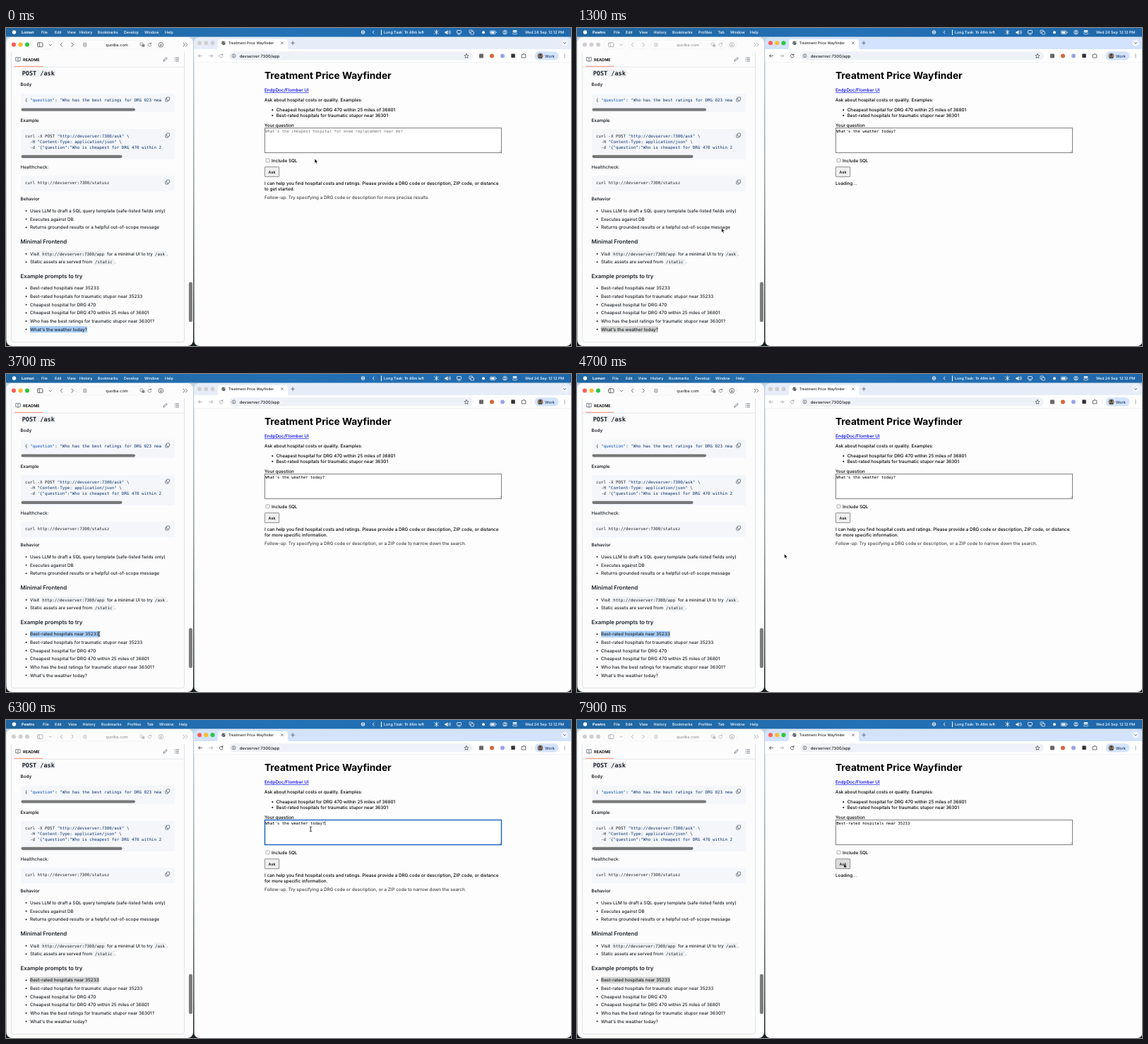
Recreate the animation shown at these times as an HTML page. Size 800x450 px, loop 8 s.

```html
<!DOCTYPE html>
<html lang="en">
<head>
<meta charset="utf-8">
<title>Screen demo</title>
<style>
html, body { margin: 0; width: 100%; height: 100%; overflow: hidden; background: #14508c; }
svg { display: block; width: 800px; height: 450px; font-weight: 450; }
text { font-family: Inter, "Open Sans", sans-serif; white-space: pre; text-rendering: geometricPrecision; }
.mono, .mono text { font-family: "DejaVu Sans Mono", "Liberation Mono", monospace; }
.line { fill: none; stroke-linecap: round; stroke-linejoin: round; }
</style>
</head>
<body>
<svg id="stage" viewBox="0 0 800 450"></svg>
<script>
const stage = document.getElementById('stage');
const $ = id => document.getElementById(id);

const text = (x, y, s, size = 6.34, more = '') =>
  `<text x="${x}" y="${y}" font-size="${size}" ${more}>${s}</text>`;
const mono = (x, y, s, size = 5.83, more = '') => text(x, y, s, size, 'class="mono" ' + more);
const bold = (x, y, s, size = 6.34, more = '') => text(x, y, s, size, 'font-weight="600" ' + more);
const pick = (x, y, s, size = 6.34, more = '') => text(x, y, s, size, 'data-pick="1" ' + more);
const rect = (x, y, w, h, fill, r = 0, more = '') =>
  `<rect x="${x}" y="${y}" width="${w}" height="${h}" fill="${fill}" rx="${r}" ${more}/>`;
const dot = (x, y, r, fill, more = '') => `<circle cx="${x}" cy="${y}" r="${r}" fill="${fill}" ${more}/>`;
const line = (d, color = '#444', w = .8, more = '') =>
  `<path class="line" d="${d}" stroke="${color}" stroke-width="${w}" ${more}/>`;
const group = (id, s, more = '') => `<g id="${id}" ${more}>${s}</g>`;
const span = (s, color) => `<tspan fill="${color}">${s}</tspan>`;
const lights = (id, xs, y) =>
  xs.map(x => dot(x, y, 3, '#cfcfd1')).join('') +
  group(id, xs.map((x, i) => dot(x, y, 3, ['#ff5f57', '#febc2e', '#28c840'][i])).join(''));

// ---- menu bar ----
const menu = (id, names, xs) => group(id, names.map((n, i) =>
  text(xs[i], 8.2, n, 5.3, i ? '' : 'font-weight="700"')).join(''), 'fill="#fff"');

function menuBar() {
  const w = '#fff';
  return rect(0, 0, 800, 12.4, 'url(#bar)') + dot(11.5, 6, 2.7, w) +
    rect(65, .8, 18, 10.4, '#fff', 2.5, 'id="editFlash" fill-opacity=".28"') +
    menu('menuA', ['Lomari', 'File', 'Edit', 'View', 'History', 'Bookmarks', 'Develop', 'Window', 'Help'],
      [22, 50, 69, 86.5, 104, 130, 167, 196, 225]) +
    menu('menuB', ['Pewtro', 'File', 'Edit', 'View', 'History', 'Bookmarks', 'Profiles', 'Tab', 'Window', 'Help'],
      [22, 52, 69, 88, 108.5, 135, 172, 199.5, 217, 245]) +
    dot(505.5, 6, 2.3, 'none', 'stroke="#fff"') + dot(505.5, 6, 1, w) +
    line('M521 4l-1.8 2 1.8 2', w) + rect(531, 2.5, 1, 7.5, w) +
    text(535, 8.2, 'Long Task: 1h 48m left', 5.3, 'fill="#fff"') +
    line('M607 4l5 4M607 8l5-4M609.5 3v6', w) +
    `<path d="M621.5 5h1.7l2.2-1.8v6l-2.2-1.8h-1.7z" fill="#fff"/>` + line('M627 4.5q1.3 1.6 0 3.2M628.6 3.5q2 2.6 0 5', w, .7) +
    rect(638.5, 3.5, 6, 4, 'none', .7, 'stroke="#fff" stroke-width=".8"') + line('M640 9.2h3', w) +
    rect(656, 3, 4.5, 4, 'none', .7, 'stroke="#fff" stroke-width=".7"') +
    rect(658, 5, 4.5, 4, '#2a6db0', .7, 'stroke="#fff" stroke-width=".7"') +
    dot(676, 6.2, 2, w) +
    rect(685.5, 4, 7.5, 4.5, 'none', 1.2, 'stroke="#fff" stroke-width=".7"') + rect(686.5, 5, 5, 2.5, w, .5) + rect(693.7, 5.4, .8, 1.7, w) +
    dot(706.5, 6, 2.8, 'none', 'stroke="#fff" stroke-width=".7"') + dot(706.5, 5.2, 1, w) + line('M705 7.7q1.5-1.3 3 0', w) +
    rect(717.5, 3.2, 6, 2.3, w, 1.1) + rect(717.5, 6.5, 6, 2.3, 'none', 1.1, 'stroke="#fff" stroke-width=".6"') +
    text(735, 8.2, 'Wed 24 Sep', 5.3, 'fill="#fff"') + text(768, 8.2, '12:12 PM', 5.3, 'fill="#fff"');
}

// ---- left window: project notes ----
const copyIcon = y => rect(225.7, y - 1.2, 4.2, 4.2, 'none', .7, 'stroke="#59636e" stroke-width=".8"') +
  rect(227.4, y - 3, 4.2, 4.2, '#f4f6fa', .7, 'stroke="#59636e" stroke-width=".8"');
const chip = (x, y, w) => rect(x, y - 6.8, w, 9, '#eff1f3', 2);
const bullet = (y, s) => dot(28.6, y - 2.2, 1.05, '#1f2328') + text(34, y, s);
const promptY = i => 370.4 + i * 11.66;

function leftWindow() {
  const key = '#0550ae', str = '#0a3069', ink = '#1f2328';
  const tools = line('M61 23l1.8 1.8 1.8-1.8M79.6 21l-2.4 2.6 2.4 2.6M93 21l2.4 2.6-2.4 2.6') +
    rect(44.5, 20.8, 7.5, 5.8, 'none', 1.2, 'stroke="#444" stroke-width=".8"') + line('M47 21v5.4') +
    rect(109.8, 21.2, 4, 5, 'none', .6, 'stroke="#777" stroke-width=".7"') + line('M110.8 23h2M110.8 24.5h2', '#777', .6) +
    text(157, 25.8, 'quolba.com', 5.6, 'text-anchor="middle" fill="#333"') +
    rect(190, 21, 4, 3.8, 'none', .7, 'stroke="#777" stroke-width=".7"') + rect(192.3, 23, 4, 3.8, '#888', .7) +
    line('M205.3 22.2a2.4 2.4 0 1 0 .5 2M205.5 20.8v1.7h-1.7', '#666', .7) +
    dot(219.3, 23.7, 3.3, 'none', 'stroke="#444" stroke-width=".7"') + line('M219.3 22v3M218 24l1.3 1.3 1.3-1.3', '#444', .7) +
    line('M251 21.2l2.3 2.4-2.3 2.4M254.5 21.2l2.3 2.4-2.3 2.4');
  const pills = [[38, 30], [73, 28], [104, 107], [213, 13]]
    .map(([x, w]) => rect(x, 17.5, w, 12.4, '#fcfcfc', 6, 'stroke="#ededed" stroke-width=".5"')).join('');
  const prompts = ['Best-rated hospitals near 35233', 'Best-rated hospitals for traumatic stupor near 35233',
    'Cheapest hospital for DRG 470', 'Cheapest hospital for DRG 470 within 25 miles of 36801',
    'Who has the best ratings for traumatic stupor near 36301?', "What's the weather today?"];
  return rect(.4, 13, 264.6, 437, '#fcfcfc', 8) + pills + lights('lightsA', [11, 20.5, 30], 23.6) + group('toolsA', tools) +
    line('M7.5 35V441q0 3.5 3.5 3.5H249q3.5 0 3.5-3.5V35M7.5 55.2H252.5', '#d5dae0', .7) +
    line('M17 42.2q-1.4-1-3.2-.6v5q1.8-.3 3.2.6q1.4-.9 3.2-.6v-5q-1.8-.4-3.2.6v5', '#59636e', .8) +
    bold(24, 46.7, 'README', 5.6) + rect(12, 53.8, 40, 1, '#fd8c73') +
    line('M223 46.8l.5-1.8 3.4-3.4 1.3 1.3-3.4 3.4z', '#59636e') +
    line('M240.5 42h4M240.5 44.4h4M240.5 46.8h4M238.8 42h.1M238.8 44.4h.1M238.8 46.8h.1', '#59636e') +
    rect(258.9, 359.5, 5, 56.5, '#7b7b7b', 2.5) +
    `<g fill="${ink}">` +
    rect(21, 58.7, 49, 10.4, '#eff1f3', 2) + mono(22.7, 66.6, 'POST /ask', 8.5, 'font-weight="700"') +
    bold(20.5, 82.4, 'Body') + bold(20.5, 133.2, 'Example') +
    rect(21, 93, 218, 26, '#f4f6fa', 2) + rect(21, 143, 218, 43, '#f4f6fa', 2) + rect(21, 209, 218, 22, '#f4f6fa', 2) +
    '<g clip-path="url(#codeClip)">' +
    mono(27, 104.4, '{ ' + span('"question"', key) + ': ' + span('"Who has the best ratings for DRG 023 near"', str)) +
    mono(27, 155, 'curl -X POST ' + span('"http://devserver:7300/ask"', str) + ' \\') +
    mono(27, 163, '  -H ' + span('"Content-Type: application/json"', str) + ' \\') +
    mono(27, 171, '  -d ' + span('\'{"question":"Who is cheapest for DRG 470 within 25 miles', str)) + '</g>' +
    rect(21.5, 113.4, 161.5, 4.2, '#777', 2.1) + rect(21.5, 179.7, 143, 4.2, '#777', 2.1) +
    [101, 152, 218].map(copyIcon).join('') +
    text(20.5, 199.3, 'Healthcheck:') + mono(27, 221.2, 'curl http://devserver:7300/statusz') +
    bold(20.5, 244.3, 'Behavior') +
    bullet(261, 'Uses LLM to draft a SQL query template (safe-listed fields only)') +
    bullet(272.7, 'Executes against DB') +
    bullet(284.4, 'Returns grounded results or a helpful out-of-scope message') +
    bold(20.5, 305.2, 'Minimal Frontend', 7.85) +
    chip(49, 321.8, 92.5) + chip(208.7, 321.8, 19) + chip(123.5, 333.4, 30.5) +
    bullet(321.8, 'Visit') + mono(51.3, 321.6, 'http://devserver:7300/app') +
    text(143, 321.8, 'for a minimal UI to try') + mono(211, 321.6, '/ask') + text(227.8, 321.8, '.') +
    bullet(333.4, 'Static assets are served from') + mono(126, 333.2, '/static') + text(153.6, 333.4, '.') +
    bold(20.5, 354, 'Example prompts to try', 7.85) +
    rect(34, 0, 0, 9, '#a5cdf8', 0, 'id="noteSel"') +
    prompts.map((p, i) => bullet(promptY(i), p)).join('') + '</g>';
}

// ---- right window: web app ----
function rightWindow() {
  const ic = '#474747';
  const frame = rect(266.5, 13.4, 534, 436.6, '#fdfdfd', 7) +
    `<path id="strip" d="M266.5 31V20.400q0-7 7-7H793q7 0 7 7V31z"/>` +
    `<path d="M296.5 30.2q3.5 0 3.5-3.5V19.5q0-3.5 3.5-3.5H395.5q3.5 0 3.5 3.5V26.7q0 3.5 3.5 3.5z" fill="#fff"/>` +
    rect(266.5, 30, 533.5, 18.3, '#fff') + rect(266.5, 48, 533.5, .5, '#e3e6ea') +
    lights('lightsB', [274, 283.2, 292.5], 21.2) +
    dot(308, 21.2, 2.7, '#4d5156') + line('M306 20.2q2 1.4 1 3M308.7 19l.6 2 1.2 .3', '#fff', .6) +
    text(314.7, 23.2, 'Treatment Price Wayfinder', 5.05, 'fill="#222" font-weight="500"') +
    line('M389.5 19.7l3 3M392.5 19.7l-3 3M403.7 21.2h4.8M406.1 18.8v4.8', ic, .7) +
    dot(791, 21.2, 4.5, '#f3f6fc') + line('M789.2 20.4l1.8 1.8 1.8-1.8', ic);
  const bar = group('navB', line('M277.5 39.4h-5M274.7 37.2l-2.2 2.2 2.2 2.2M306.7 38a2.4 2.4 0 1 0 .5 2M307 36.5v1.8h-1.8', ic)) +
    line('M287.7 39.4h5M290.5 37.2l2.2 2.2-2.2 2.2', '#aaa') +
    rect(316, 33.2, 345, 12.4, '#eef1f7', 6.2) +
    dot(322.5, 39.4, 2.5, 'none', 'stroke="#555" stroke-width=".7"') + line('M322.5 39.2v1.5M322.5 38v.1', '#555', .7) +
    text(330.7, 41.5, 'devserver:7300/app', 5.8, 'fill="#222"') +
    line('M652 36.6l.9 1.9 2.1 .3-1.5 1.5 .4 2.1-1.9-1-1.9 1 .4-2.1-1.5-1.5 2.1-.3z', ic, .7) +
    rect(670, 36.4, 6, 6, '#686868', 1) + dot(688, 39.4, 3, '#d9653b') + dot(703, 39.4, 3, '#9aa4e8') + rect(715.3, 36.6, 5.5, 5.5, '#333', .5) +
    line('M730.5 37.7h1.7q0-1.5 1-1.5t1 1.5h1.7v4.3h-5.4z', ic, .8) +
    rect(743, 36, .5, 7, '#ccd5e6') + rect(748.5, 33.2, 34, 12.4, '#d3e3fd', 6.2) +
    dot(756.5, 39.4, 4, '#8a7a6b') + dot(756.5, 38.2, 1.4, '#3d3530') + line('M754.7 42q1.8-2 3.6 0', '#3d3530', 1.2) +
    text(763, 41.5, 'Work', 5.5, 'fill="#1f3a68" font-weight="500"') +
    [37, 39.4, 41.8].map(y => dot(791, y, .6, ic)).join('');
  const answer = (id, a, b, c) => group(id, pick(366, 221.8, a) + pick(366, 229.6, b) + pick(366, 241.9, c, 6.34, 'fill="#444"'));
  const intro = 'I can help you find hospital costs and ratings. Please provide a DRG code or description, ZIP code, or distance';
  const page = pick(366, 72.3, 'Treatment Price Wayfinder', 13.7, 'font-weight="700"') +
    pick(366, 90, 'EndpDoc/Flomber UI', 6.34, 'fill="#0000ee" text-decoration="underline"') +
    pick(366, 104.2, 'Ask about hospital costs or quality. Examples:') +
    dot(377.3, 116, 1.05, '#000') + dot(377.3, 123.8, 1.05, '#000') +
    pick(382.7, 118.2, 'Cheapest hospital for DRG 470 within 25 miles of 36801') +
    pick(382.7, 126, 'Best-rated hospitals for traumatic stupor near 36301') +
    pick(366, 140, 'Your question') +
    rect(366.5, 141.5, 335, 35, '#fff', 0, 'id="field"') +
    line('M698.5 175.5l2.5-2.5M700.2 175.5l.8-.8', '#777', .5) +
    '<g class="mono">' +
    group('hint', text(367.2, 147.6, "What's the cheapest hospital for knee replacement near me?", 5.58, 'fill="#757575"')) +
    group('weather', pick(367.2, 147.6, "What's the weather today?", 5.58)) +
    group('rated', text(367.2, 147.6, 'Best-rated hospitals near 35233', 5.58)) + '</g>' +
    rect(451.6, 142.8, .6, 6.2, '#000', 0, 'id="caret"') +
    rect(368, 184.9, 5, 5, '#fff', 1, 'stroke="#767676" stroke-width=".6"') + pick(376, 189.8, 'Include SQL') +
    rect(366.4, 196.6, 20.3, 13.8, '#efefef', .5, 'id="button" stroke="#767676" stroke-width=".8"') +
    pick(371.6, 205.7, 'Ask', 5.5) +
    group('loading', text(366, 221.8, 'Loading...')) +
    answer('answerA', intro, 'to get started.', 'Follow-up: Try specifying a DRG code or description for more precise results.') +
    answer('answerB', intro, 'for more specific information.', 'Follow-up: Try specifying a DRG code or description, or a ZIP code to narrow down the search.');
  return frame + bar + page;
}

stage.innerHTML = `<defs>
  <linearGradient id="bar"><stop stop-color="#20659f"/><stop offset=".5" stop-color="#2371b6"/><stop offset="1" stop-color="#1f67a9"/></linearGradient>
  <linearGradient id="desk" x2="0" y2="1"><stop stop-color="#c3d8ea"/><stop offset=".5" stop-color="#8f9a98"/><stop offset="1" stop-color="#16201f"/></linearGradient>
  <clipPath id="codeClip"><rect x="21" y="90" width="199" height="100"/></clipPath></defs>` +
  rect(0, 0, 800, 450, 'url(#desk)') + menuBar() + leftWindow() + rightWindow() +
  group('pointer',
    dot(.5, 1.8, 16.2, 'none', 'id="press" stroke="#000" stroke-width="1.5"') +
    '<path id="arrow" d="M0 0V6.3L1.5 5 2.5 7.3 3.7 6.8 2.7 4.6H4.7Z" stroke="#fff" stroke-width=".6"/>' +
    line('M-1.2-3.3Q0-3.3 0-2.5Q0-3.3 1.2-3.3M0-2.5V2.5M-1.2 3.3Q0 3.3 0 2.5Q0 3.3 1.2 3.3', '#000', .7, 'id="beam"'));

// A selection box behind every selectable text on the web page
for (const el of stage.querySelectorAll('[data-pick]')) {
  const b = el.getBBox();
  el.insertAdjacentHTML('beforebegin', rect(b.x, b.y, b.width, b.height, '#a9cffb', 0, 'class="picked"'));
}
const picked = [...stage.querySelectorAll('.picked')];
const typedBox = $('weather').querySelector('.picked');

// ---- timeline ----
const path = [[0, 437, 185], [150, 432, 157], [450, 430, 156], [800, 377.5, 203], [1200, 377.5, 203],
  [1300, 204.5, 283], [1700, 120, 335], [2500, 36, 366], [3000, 33.5, 367], [3100, 34, 368], [3500, 132, 368],
  [3800, 132, 368], [4700, 293.5, 254.5], [5300, 427, 156], [5900, 427, 156], [6300, 431.5, 154.5],
  [6900, 431.5, 154.5], [7500, 377.8, 203.3], [8000, 377.8, 203.3]];

function pointerAt(t) {
  const i = path.findIndex(p => p[0] > t);
  const [t0, x0, y0] = path[i - 1], [t1, x1, y1] = path[i], k = (t - t0) / (t1 - t0);
  return [x0 + (x1 - x0) * k, y0 + (y1 - y0) * k];
}

const within = (t, ...spans) => spans.some(([a, b]) => t >= a && t < b);
const show = (el, on) => { el.style.display = on ? '' : 'none'; };

function draw(t) {
  const webActive = within(t, [100, 3100], [5800, 8000]);
  const focus = within(t, [200, 900], [6100, 7600]);
  const loading = within(t, [1000, 3400], [7600, 8000]);
  const allPicked = within(t, [5900, 6100]);
  const [x, y] = pointerAt(t);
  const overField = x > 366 && x < 702 && y > 141 && y < 177;
  const beam = overField || within(t, [3100, 3800]);
  const visible = {
    menuA: !webActive, lightsA: !webActive, menuB: webActive, lightsB: webActive,
    editFlash: within(t, [400, 500], [3500, 3600], [5900, 6000], [6500, 6600], [6700, 6800]),
    hint: t < 400, weather: within(t, [400, 6700]), rated: t >= 6700,
    caret: within(t, [6100, 6500]), loading,
    answerA: t < 1000, answerB: !loading && t >= 1000,
    press: within(t, [100, 200], [900, 1000], [3000, 3500], [5800, 5900], [6100, 6200], [7600, 7700]),
    arrow: !beam, beam
  };
  for (const id in visible) show($(id), visible[id]);
  for (const el of picked) show(el, allPicked || (el === typedBox && within(t, [6500, 6700])));

  $('toolsA').setAttribute('opacity', webActive ? .5 : 1);
  $('navB').setAttribute('opacity', webActive ? 1 : .5);
  $('strip').setAttribute('fill', webActive ? '#d3e3fd' : '#e7edf8');
  $('field').setAttribute('stroke', focus ? '#1660bd' : '#808080');
  $('field').setAttribute('stroke-width', focus ? 1.4 : 1);
  $('button').setAttribute('fill', x > 366 && x < 387 && y > 197 && y < 211 ? '#dcdcdc' : '#efefef');

  const last = t < 3100;
  const sel = $('noteSel');
  sel.setAttribute('y', promptY(last ? 5 : 0) - 6.8);
  sel.setAttribute('width', last ? 81 : 98 * Math.min(1, (t - 3100) / 400));
  sel.setAttribute('fill', webActive ? '#d3d3d3' : '#a5cdf8');
  $('pointer').setAttribute('transform', `translate(${x} ${y})`);
}

function tick(now) {
  draw(Math.floor(now % 8000 / 100) * 100);
  requestAnimationFrame(tick);
}
draw(0);
requestAnimationFrame(tick);
</script>
</body>
</html>
```
